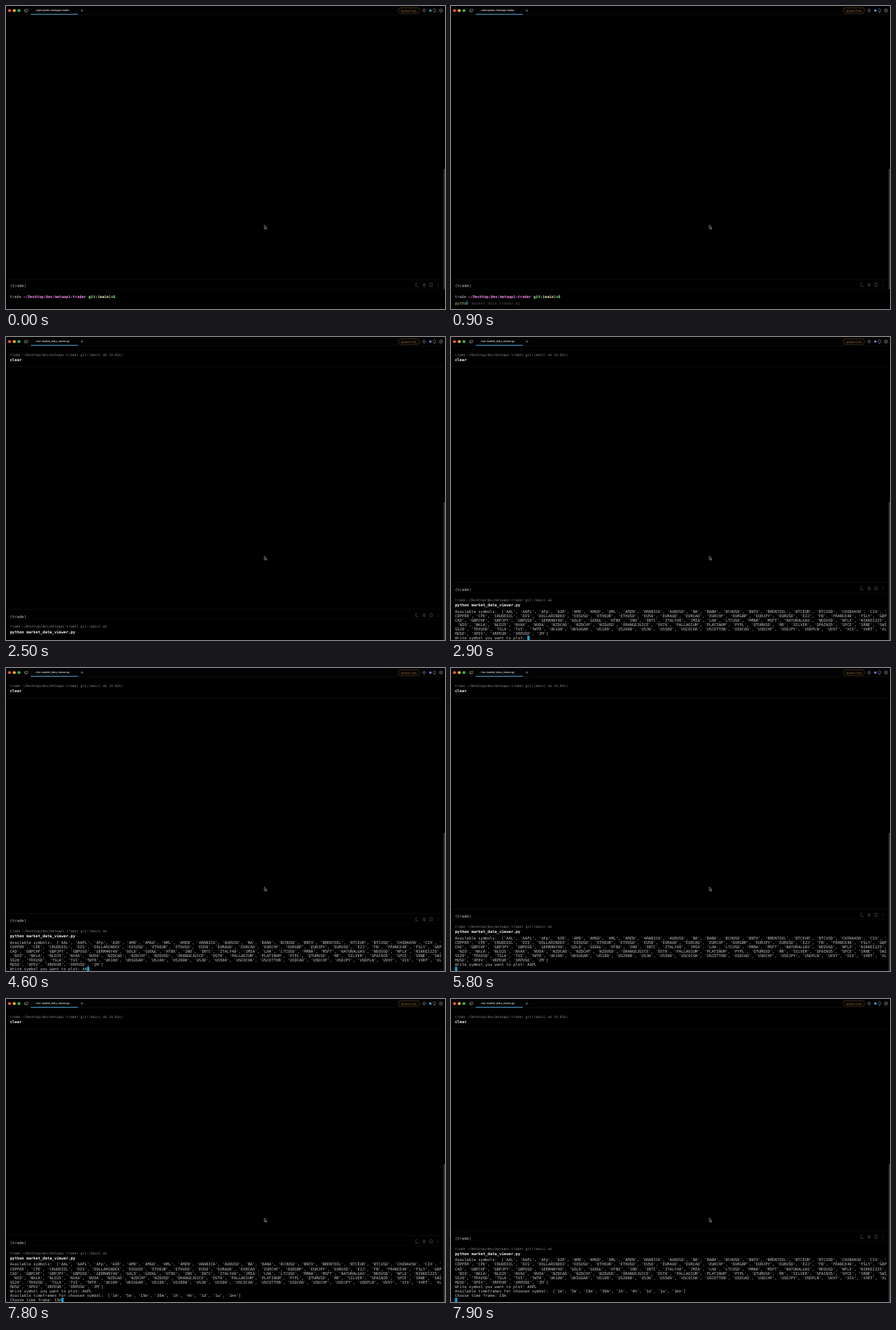
An HTML page for the animation above (8000 ms loop, 600 by 414 pixels).

```html
<!DOCTYPE html>
<html lang="en">
<head>
<meta charset="utf-8">
<title>Terminal session</title>
<style>
  html, body { margin: 0; width: 100%; height: 100%; overflow: hidden; background: #000; }
  svg { display: block; width: 600px; height: 414px; }
  text { white-space: pre; text-rendering: geometricPrecision; font: 5.3px "DejaVu Sans Mono", monospace; fill: #c4c4c4; }
  .prompt { font-size: 5.1px; }
  .past { font-size: 4.58px; fill: #858585; }
  .bold { font-weight: 700; fill: #f4f4f4; }
  .ui { font: 500 3.75px Roboto, sans-serif; fill: #d0d0d0; }
  .path { fill: #f58af2; font-weight: 700; }
  .git { fill: #a9f59a; font-weight: 700; }
  .branch { fill: #f2f2b4; font-weight: 700; }
  .changes { fill: #86ee8c; font-weight: 700; }
  .typed { fill: #a9c98a; }
  .ghost { fill: #4c4c4c; }
  .cursor { fill: #18a8d4; }
  .rule { stroke: #161616; stroke-width: .6; }
  .faint { stroke: #0e0e0e; }
  .icon { fill: none; stroke: #5c5c5c; stroke-width: .55; }
  .bright { stroke: #969696; }
  #dot { animation: dot 8s linear infinite; }
  @keyframes dot {
    0% { fill: #38a6c0; }
    10%, 22% { fill: #4a9fe6; }
    30%, 82% { fill: #7a7ce0; }
    92%, 100% { fill: #3fa9e0; }
  }
</style>
</head>
<body>
<svg viewBox="0 0 600 414" xml:space="preserve">
  <rect width="600" height="12" fill="#020202"/>
  <path class="rule" d="M0 12H600"/>
  <circle cx="4.8" cy="6.2" r="2" fill="#f4593b"/>
  <circle cx="11.3" cy="6.2" r="2" fill="#f3b52f"/>
  <circle cx="17.7" cy="6.2" r="2" fill="#35b84a"/>
  <path class="icon bright" d="M26.6 4.4H30V7.2H26.6ZM26.6 5.2H25.4V8H28.8V7.2"/>
  <text class="ui" id="title" x="39.3" y="7.3"></text>
  <path d="M34 11.3H98" stroke="#4ba3d8"/>
  <path class="icon bright" d="M101.8 6.2H105.8M103.8 4.2V8.2"/>
  <rect x="536.3" y="2.5" width="28.6" height="7.4" rx="2.4" fill="#060402" stroke="#5e4426" stroke-width=".6"/>
  <text class="ui" x="550.6" y="7.5" text-anchor="middle" style="fill:#7c5a30">Update Term</text>
  <path class="icon bright" d="M571.4 3.8L572.1 5.4L573.7 6.2L572.1 7L571.4 8.6L570.7 7L569.1 6.2L570.7 5.4Z"/>
  <circle id="dot" cx="580" cy="6.2" r="1.6"/>
  <path class="icon bright" d="M584.8 7.2A1.8 1.8 0 1 1 586.4 7.2V8.6H584.8Z"/>
  <circle class="icon bright" cx="594.5" cy="6.2" r="2.3"/>
  <circle class="icon bright" cx="594.5" cy="6.2" r=".8"/>
  <g id="screen"></g>
  <path d="M353.1 299.3V304.5L354.3 303.4L355.1 305.2L356 304.8L355.2 303.1H356.7Z" fill="#111" stroke="#c4c4c4" stroke-width=".5"/>
</svg>
<script>
const LOOP = 8000, LEFT = 5.4, ADVANCE = 3.19, COLS = 185, PITCH = 6.1, BOTTOM = 411.3;
const COMMAND = 'python market_data_viewer.py';
const FOLDER = '~/Desktop/dev/metaapi-trader';

const symbols = `AAL AAPL AFp AIR AMD AMGO AML AMZN ARABICA AUDUSD BA BABA BCHUSD BNTX BRENTOIL
BTCEUR BTCUSD CHINAA50 CIX COPPER CPE CRUDEOIL DIS DOLLARINDEX EOSUSD ETHEUR ETHUSD EU50 EURAUD
EURCAD EURCHF EURGBP EURJPY EURUSD EZJ FB FRANCE40 FSLY GBPCAD GBPCHF GBPJPY GBPUSD GERMANY40 GOLD
GOOGL HTBX INO INTC ITALY40 JMIA LHA LTCUSD MRNA MSFT NATURALGAS NEOUSD NFLX NIKKEI225 NIO NKLA
NLD25 NVAX NVDA NZDCAD NZDCHF NZDUSD ORANGEJUICE OSTK PALLADIUM PLATINUM PYPL QTUMUSD RR SILVER
SPAIN35 SPCE SRNE SWISS20 TRXUSD TSLA TUI TWTR UK100 UKSUGAR US100 US2000 US30 US500 USCOCOA
USCOTTON USDCAD USDCHF USDJPY USDPLN UVXY VIX VXRT XLMUSD XPEV XRPEUR XRPUSD ZM`;

const pyList = words => '[' + words.split(/\s+/).map(w => `'${w}'`).join(', ') + ']';
const wrap = s => s.match(new RegExp(`.{1,${COLS}}`, 'g'));
const symbolRows = wrap('Available symbols:  ' + pyList(symbols));
const frameRow = 'Available timeframes for choosen symbol:  ' + pyList('1m 5m 15m 30m 1h 4h 1d 1w 1mn');

// Key press times in ms
const keys = {
  command: [200, 400, 500, 700, 900, 1100, 1300],
  symbol: [4000, 4400, 4900, 5300],
  frame: [7000, 7300, 7600]
};
const ACCEPT = 1900, RUN = 2300, READY = 2700, LIST = 2900;
const SYMBOL_ENTER = 5700, FRAMES = 6000, FRAME_ENTER = 7900;

const typed = (word, times, t) => word.slice(0, times.filter(k => t >= k).length);
const text = (y, content, cls = '') =>
  `<text class="${cls}" x="${LEFT}" y="${y + 1.9}">${content}</text>`;
const span = (cls, s) => `<tspan class="${cls}">${s}</tspan>`;
const rule = (y, cls = '') => `<path class="rule ${cls}" d="M0 ${y}H598"/>`;
const cursor = (y, col, width = ADVANCE) =>
  `<rect class="cursor" x="${LEFT + col * ADVANCE}" y="${y - 3}" width="${width}" height="5.8"/>`;
const scrollbar = (top, bottom) =>
  `<rect x="598.2" y="${top}" width="1.8" height="${bottom - top}" fill="#383838"/>`;

const blockTools = y => `<g class="icon" transform="translate(0 ${y})">
  <path d="M560 -2.4V2H564M560 -2.4H562M571.6 -2.5V2.5M570 -.7L571.6 -2.5L573.2 -.7V1L571.6 2.5L570 1ZM579.4 -2.4H582.6V2.4L581 1.1L579.4 2.4Z"/>
  <path d="M590.3 -2.2V-1.5M590.3 -.3V.4M590.3 1.6V2.3" stroke-width=".8"/></g>`;

function editor(t) {
  const input = t >= ACCEPT ? COMMAND : typed('python ', keys.command, t);
  let out = scrollbar(223, 387) + rule(374) + rule(387.3, 'faint') +
    text(382.4, '(trade)') + blockTools(381.2) +
    text(396.7, 'trade ' + span('path', FOLDER) + ' ' + span('git', 'git:') +
      span('branch', '(main)') + span('changes', '±6'), 'prompt');
  if (input) {
    out += text(405.8, span('typed', input) + span('ghost', COMMAND.slice(input.length))) +
      cursor(405.8, input.length, .9);
  }
  return out;
}

function outputRows(t) {
  if (t < LIST) return [''];
  const rows = [...symbolRows, 'Write symbol you want to plot: ' + typed('AAPL', keys.symbol, t)];
  if (t >= FRAMES) rows.push(frameRow, 'Choose time frame: ' + typed('15m', keys.frame, t));
  if (t >= FRAME_ENTER || (t >= SYMBOL_ENTER && t < FRAMES)) rows.push('');
  return rows;
}

function running(t) {
  const rows = outputRows(t);
  const top = BOTTOM - PITCH * (rows.length - 1);
  const prompt = `trade ${FOLDER} git:(main) ±6`;
  return scrollbar(225.5, 414) +
    text(24, prompt + ' (0.03s)', 'past') + text(31, 'clear', 'bold') + rule(40.8) +
    rule(top - 39.3) + rule(top - 25.6, 'faint') +
    text(top - 29.5, '(trade)') + blockTools(top - 31.2) +
    text(top - 15.8, prompt, 'past') + text(top - 8.2, COMMAND, 'bold') +
    rows.map((row, i) => text(top + i * PITCH, row)).join('') +
    (t >= READY ? cursor(BOTTOM, rows.at(-1).length) : '');
}

const screen = document.getElementById('screen');
const title = document.getElementById('title');
let shown;

function draw(now) {
  const t = now % LOOP;
  const view = t < RUN ? editor(t) : running(t);
  if (view !== shown) {
    screen.innerHTML = shown = view;
    title.textContent = t < RUN ? '..esktop/dev/metaapi-trader' : '..hon market_data_viewer.py';
  }
  requestAnimationFrame(draw);
}
draw(0);
</script>
</body>
</html>
```
